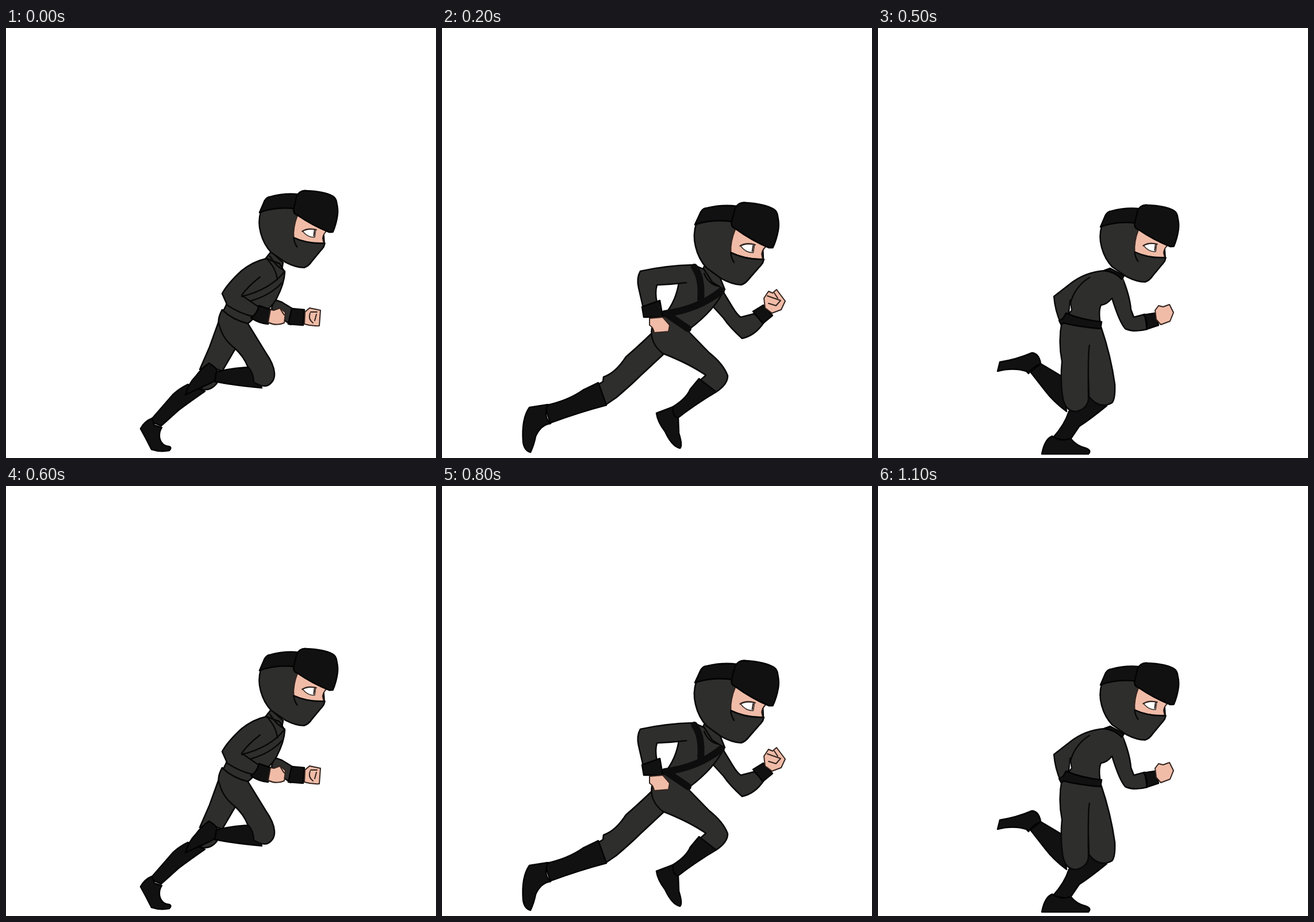
An HTML page with a canvas for the animation above (1200 ms loop, 748x748 px).

```html
<!DOCTYPE html>
<html lang="en">
<head>
<meta charset="utf-8">
<title>Running ninja</title>
<style>
html, body { margin: 0; width: 100%; height: 100%; overflow: hidden; background: #fff; }
canvas { display: block; width: 748px; height: 748px; }
</style>
</head>
<body>
<canvas id="stage" width="748" height="748"></canvas>
<script>
const ctx = document.getElementById('stage').getContext('2d');
const STEP = 100;

// Part kinds: fill, outline colour, outline width
const kinds = {
  cloth: ['#2e2e2d', '#080808', 2.5],
  plain: ['#2e2e2d', null, 0],
  black: ['#111111', '#030303', 2.5],
  skin:  ['#f0bca8', '#33241f', 2],
  white: ['#ffffff', '#3a322e', 1.6],
  gap:   ['#ffffff', '#080808', 2],
  line:  [null, '#080808', 2.4],
  thin:  [null, '#33241f', 2],
  strap: [null, '#0d0d0d', 12]
};

const part = (kind, d) => ({ kind, path: new Path2D(d) });

function paint({ kind, path }) {
  const [fill, edge, width] = kinds[kind];
  if (fill) {
    ctx.fillStyle = fill;
    ctx.fill(path);
  }
  if (edge) {
    ctx.strokeStyle = edge;
    ctx.lineWidth = width;
    ctx.stroke(path);
  }
}

// Head, relative to the back lower corner of the cap
const head = [
  part('cloth', 'M2 -3 Q-1 17 7 35 Q15 54 30 66 L56 79 Q76 86 90 84 Q97 81 102 71 L119 43 L119 37 L110 -4 L58 -22Z'),
  part('skin', 'M66 -4 Q61 18 65 35 Q88 42 118 37 L115 29 Q115 22 119 17 L112 0Z'),
  part('plain', 'M65 35 Q92 43 120 37 Q119 45 115 50 L102 71 Q97 81 90 83 L78 82 L60 60Z'),
  part('line', 'M73 50 Q67 44 65 35 Q92 43 120 37 Q119 45 115 50 L102 71 Q97 81 90 84'),
  part('white', 'M79 22 Q87 15 101 16 L101 29 Q90 32 79 22Z'),
  part('thin', 'M78 22 Q87 14 102 16 M99 18 L99 27'),
  part('black', 'M0 0 L6 -22 Q9 -29 15 -30 Q38 -40 63 -41 L62 -15 Q28 -15 0 0Z'),
  part('black', 'M60 -37 Q64 -49 76 -49 Q106 -52 122 -46 Q129 -43 131 -34 Q135 -24 135 -14 Q135 2 131 16 L125 17 Q95 10 65 -5 Q58 -6 58 -15Z')
];

function drawHead([x, y, turn, size]) {
  ctx.save();
  ctx.translate(x, y);
  ctx.rotate(turn * Math.PI / 180);
  ctx.scale(size, size);
  head.forEach(paint);
  ctx.restore();
}

// Each pose: head place, turn and size, then body parts from back to front
const pose = (at, ...parts) => ({ at, parts: parts.map(p => part(...p)) });

const poses = [
  // push off
  pose([441, 321, 8, 1],
    ['cloth', 'M466 472 L480 477 L498 488 L495 516 Q478 505 462 488Z'],
    ['black', 'M497 488 L519 490 L517 517 L491 515Z'],
    ['skin', 'M520 494 L528 487 L547 491 L545 518 Q532 519 519 515Z'],
    ['thin', 'M530 494 L541 494 M529 496 Q525 506 534 513 M540 498 L537 509'],
    ['cloth', 'M372 505 L354 555 L337 594 L353 588 L376 597 L400 556 L412 540Z'],
    ['cloth', 'M338 628 Q355 633 367 618 L358 608Z'],
    ['black', 'M316 620 L346 632 Q320 650 300 665 L270 692 L250 684 L290 638 Q300 628 316 620Z'],
    ['black', 'M254 679 Q241 684 234 697 Q244 715 253 733 Q268 738 284 735 Q289 730 284 728 Q270 727 267 712 Q266 702 271 695 L258 691Z'],
    ['black', 'M353 583 Q370 592 368 604 Q365 614 355 618 L312 638 Q318 618 330 606 Q340 592 353 583Z'],
    ['black', 'M366 598 Q400 590 430 590 L445 626 Q400 622 363 615Z'],
    ['cloth', 'M376 490 Q366 508 372 520 Q378 542 398 557 Q414 572 420 588 Q431 600 431 616 Q445 625 455 622 Q468 615 467 600 Q466 585 452 565 L420 513Z'],
    ['cloth', 'M450 403 L461 389 L482 408 L479 425Z'],
    ['cloth', 'M453 401 Q430 406 410 422 Q385 445 376 462 L384 480 L378 492 Q395 508 421 514 L432 504 Q461 490 471 470 Q484 445 485 425 L476 410Z'],
    ['line', 'M453 401 Q470 418 472 438 M459 397 Q471 416 484 422 M485 423 Q460 455 410 467 M480 443 Q460 465 425 475'],
    ['line', 'M442 433 Q420 450 410 465 L442 487 M383 481 Q405 496 430 502'],
    ['black', 'M440 483 L461 490 L456 515 Q440 514 426 504 Q437 497 440 483Z'],
    ['skin', 'M460 490 L466 491 L477 487 L486 495 L484 513 Q470 519 456 512Z'],
    ['thin', 'M477 488 Q482 497 484 499']),

  // full stretch
  pose([456, 291, 0.8, 1.01],
    ['cloth', 'M516 375 Q525 395 530 420 L536 449 Q554 451 572 447 L570 471 Q545 480 528 482 Q512 455 503 428Z'],
    ['black', 'M568 444 L590 439 L591 468 L569 472 Q574 456 568 444Z'],
    ['skin', 'M590 437 L612 430 Q619 445 618 463 L614 467 L597 467Z'],
    ['thin', 'M605 435 L601 460 M597 447 L611 446 M598 451 L608 459'],
    ['cloth', 'M380 478 Q350 510 324 537 Q298 568 275 577 L282 598 L298 612 Q328 590 355 564 Q388 538 412 515Z'],
    ['black', 'M275 580 Q252 594 240 615 Q228 642 206 660 Q204 675 214 684 Q235 660 301 612 Q282 603 275 580Z'],
    ['black', 'M210 656 Q192 660 185 682 Q190 700 189 715 Q190 732 200 739 L216 740 Q218 735 212 730 Q212 710 222 689 Q204 679 210 656Z'],
    ['black', 'M482 561 L507 586 Q470 605 433 643 Q424 631 418 617 Q440 605 448 590 Q458 572 482 561Z'],
    ['black', 'M418 615 L397 628 Q400 650 415 672 Q423 692 441 695 Q440 680 434 665 L437 640 Q421 638 418 615Z'],
    ['cloth', 'M395 448 Q372 466 380 492 Q392 508 412 519 Q448 541 478 556 L486 568 L504 585 L527 570 Q525 555 510 530 Q490 505 452 478 L450 455Z'],
    ['cloth', 'M484 361 L510 372 L518 380 Q514 410 502 430 Q470 447 450 470 L438 475 L395 450 L424 422 L440 390Z'],
    ['cloth', 'M484 361 Q430 362 383 386 Q388 412 397 434 L420 427 L419 398 L440 397 Q466 387 468 391 L490 380Z'],
    ['gap', 'M420 399 L439 397 L425 419 L420 425Z'],
    ['strap', 'M489 362 Q505 380 498 407 M514 379 Q514 405 480 429 Q455 440 430 441'],
    ['black', 'M395 433 L428 423 L433 450 L403 456Z'],
    ['black', 'M445 464 L454 464 L450 474 L444 476Z'],
    ['skin', 'M407 456 L432 450 L446 463 L444 478 L437 482 L432 480 L430 485 L412 483Z']),

  // airborne
  pose([440, 342, 9.6, 1.07],
    ['cloth', 'M488 457 L505 485 Q514 500 520 503 L543 497 L560 512 Q545 535 522 540 Q500 520 490 505 L470 483Z'],
    ['black', 'M541 493 L559 482 L575 500 L558 514Z'],
    ['skin', 'M560 470 L568 458 L575 461 L582 455 L597 475 L590 490 L574 496 L562 487Z'],
    ['thin', 'M566 466 L589 474 M568 479 L581 483 L589 474 M578 461 L584 470'],
    ['cloth', 'M368 528 Q340 555 320 572 Q302 600 281 607 L280 615 L272 620 L284 656 L303 643 Q330 620 345 605 L388 565Z'],
    ['black', 'M272 617 L286 656 Q240 668 188 687 L179 657 Q220 648 245 630Z'],
    ['black', 'M184 655 L152 660 Q138 680 141 720 Q143 735 154 738 Q160 725 163 710 Q172 690 189 688 Q176 678 184 655Z'],
    ['black', 'M447 610 L477 633 Q440 655 408 680 Q400 674 400 660 Q425 645 432 628Z'],
    ['black', 'M402 659 L373 670 Q375 685 388 702 Q400 728 414 731 Q419 727 412 705 L411 679 Q400 674 402 659Z'],
    ['cloth', 'M388 497 L365 522 Q361 548 384 566 Q430 584 459 604 L450 612 L477 633 Q497 620 497 605 Q490 585 465 565 L428 527Z'],
    ['cloth', 'M450 428 L460 406 L482 430 L492 455 L475 460Z'],
    ['cloth', 'M437 412 L456 420 L470 442 L491 455 Q475 490 430 524 L388 498 Q407 475 412 443Z'],
    ['cloth', 'M437 412 Q390 413 345 423 Q338 435 342 452 L350 487 L374 478 Q370 460 374 447 Q400 446 425 443'],
    ['strap', 'M439 416 Q453 435 450 472 M486 457 Q445 490 387 497 M390 497 L428 523'],
    ['line', 'M456 427 Q464 446 481 449'],
    ['black', 'M348 485 L379 474 L384 503 L351 503Z'],
    ['skin', 'M361 505 L384 503 L396 517 L394 528 L369 530 Q368 521 361 517Z']),

  // heel strike
  pose([402, 297, 0, 1],
    ['black', 'M203 508 Q230 532 262 545 Q240 555 238 583 Q225 570 210 556 L184 529Z'],
    ['black', 'M205 508 L198 500 L181 487 Q150 510 133 528 Q127 545 138 547 Q155 535 185 530 Q185 515 205 508Z'],
    ['cloth', 'M328 455 Q300 490 290 510 Q270 543 257 545 Q240 555 237 580 Q248 597 272 593 Q295 575 320 545 L352 510 L380 475Z'],
    ['black', 'M391 606 Q410 612 433 597 Q436 640 454 697 L430 702 Q425 675 402 648 Q392 630 391 606Z'],
    ['black', 'M428 697 Q442 700 455 691 Q470 698 490 695 Q505 687 513 690 Q514 700 500 710 Q475 725 440 733 Q428 728 427 705Z'],
    ['cloth', 'M352 510 Q362 520 370 555 Q380 577 390 590 L389 604 Q405 614 425 600 L427 573 Q420 550 412 530 Q395 500 396 470 L342 440 L328 455'],
    ['cloth', 'M430 361 Q390 352 346 352 Q325 365 309 390 L325 403 Q340 383 356 377 Q385 380 398 384'],
    ['black', 'M290 400 L304 383 Q312 391 328 399 L317 415 Q302 411 290 400Z'],
    ['skin', 'M272 410 L288 401 L307 412 L304 425 L290 435 L277 426Z'],
    ['thin', 'M279 409 L292 415 L300 412 M281 420 L292 419'],
    ['cloth', 'M458 376 Q470 400 492 428 L507 415 L524 440 L489 462 Q470 445 458 428 L440 410Z'],
    ['plain', 'M430 361 L458 378 L456 413 L442 416 Q413 428 398 463 L345 432 Q372 408 397 380Z'],
    ['line', 'M442 416 Q413 428 398 463 M345 432 Q372 408 397 380'],
    ['cloth', 'M498 425 Q510 419 514 410 L527 427 Q526 440 516 444 Q514 430 498 425Z'],
    ['black', 'M502 424 Q511 418 515 411 L527 427 Q525 438 518 442 Q515 430 502 424Z'],
    ['skin', 'M509 399 L514 390 L520 391 L526 384 L543 403 L536 420 L527 426 L511 411Z'],
    ['black', 'M352 427 Q372 450 398 460 L395 472 Q362 465 341 442Z'],
    ['black', 'M426 363 Q445 365 456 381 L455 370 L435 359Z']),

  // landing
  pose([394, 321, 4, 1],
    ['black', 'M244 547 Q268 568 296 578 L287 625 Q265 608 250 592 L225 565Z'],
    ['black', 'M246 547 L226 527 Q195 545 170 556 Q164 572 176 576 Q200 565 227 567 Q230 553 246 547Z'],
    ['cloth', 'M328 485 Q308 530 303 560 Q283 580 282 603 Q282 627 310 627 Q330 615 345 590 L362 550 L390 495Z'],
    ['black', 'M380 630 Q400 640 423 625 Q420 665 403 706 L374 708 Q382 680 380 630Z'],
    ['black', 'M374 704 Q390 709 402 702 Q425 720 450 726 Q455 738 440 742 L368 742 Q362 725 374 704Z'],
    ['cloth', 'M358 545 Q367 570 372 600 L379 632 Q400 645 424 624 Q420 580 408 550 L393 493 L336 476 L328 485'],
    ['cloth', 'M418 388 Q370 385 328 410 Q312 430 306 445 L322 458 Q332 440 345 430 L385 420'],
    ['black', 'M297 455 L307 441 L326 455 L316 471Z'],
    ['skin', 'M284 467 L296 457 L313 469 L309 482 L296 489 L285 480Z'],
    ['cloth', 'M444 402 Q462 440 468 462 L486 457 L496 482 Q478 495 460 490 Q442 470 428 440Z'],
    ['plain', 'M418 388 L446 403 L438 436 Q395 458 393 490 L338 468 Q355 438 385 408Z'],
    ['line', 'M430 440 Q395 458 393 490 M338 468 Q355 438 385 412'],
    ['black', 'M482 459 L500 451 L508 473 L492 483Z'],
    ['skin', 'M501 447 L508 439 L522 436 L532 450 L525 465 L509 472Z'],
    ['black', 'M344 461 Q365 480 394 486 L392 498 Q355 492 334 478Z'],
    ['black', 'M413 388 Q432 391 444 405 L446 396 L422 384Z']),

  // passing
  pose([387, 346, 8, 1],
    ['black', 'M283 584 L320 606 L328 667 Q305 650 290 630 L265 598Z'],
    ['black', 'M283 584 Q280 566 268 565 Q240 577 212 581 L208 597 Q235 590 258 597 L262 601 Q268 590 283 584Z'],
    ['black', 'M365 640 L398 657 Q370 680 350 693 L333 718 L304 713 Q325 690 332 667Z'],
    ['black', 'M303 710 Q290 715 285 741 L366 741 Q372 735 362 731 Q345 727 335 714 Q318 721 303 710Z'],
    ['cloth', 'M362 518 L388 520 Q405 570 412 620 Q413 645 407 652 Q385 664 367 641 L364 550Z'],
    ['plain', 'M320 510 L386 520 Q368 540 367 560 Q366 600 366 645 Q365 662 345 667 Q325 668 321 640 Q317 610 320 580 Q313 545 320 510Z'],
    ['line', 'M368 552 Q365 560 366 645 Q365 662 345 667 Q325 668 321 640 Q317 610 320 580 Q313 545 320 510'],
    ['cloth', 'M424 432 Q438 465 440 490 L445 503 L464 498 L468 524 Q445 530 430 523 Q420 512 407 470Z'],
    ['plain', 'M396 422 Q360 424 333 446 L306 467 Q308 492 318 514 L387 515 Q383 492 388 482 Q398 481 407 470 L428 458 L427 434Z'],
    ['line', 'M396 422 Q360 424 333 446 L306 467 Q308 492 318 514 M387 515 Q383 492 388 482 Q398 481 407 470'],
    ['line', 'M368 434 Q345 448 336 474 L330 502'],
    ['gap', 'M334 473 L337 491 L332 497Z'],
    ['black', 'M462 499 L482 496 L488 517 L467 524 Q470 508 462 499Z'],
    ['skin', 'M482 491 L488 483 L496 485 L507 481 L514 495 L508 510 L492 516 L484 507Z'],
    ['black', 'M327 496 Q355 508 389 511 L387 523 Q350 520 322 513 L319 517 L315 509 L322 505Z'],
    ['black', 'M393 422 Q412 424 424 437 L428 431 L404 418Z'])
];

ctx.lineJoin = ctx.lineCap = 'round';

function draw(time) {
  const { at, parts } = poses[Math.floor(time / STEP) % poses.length];
  ctx.fillStyle = '#fff';
  ctx.fillRect(0, 0, 748, 748);
  parts.forEach(paint);
  drawHead(at);
}

const start = performance.now();

function tick() {
  draw(performance.now() - start);
  requestAnimationFrame(tick);
}
tick();
</script>
</body>
</html>
```
